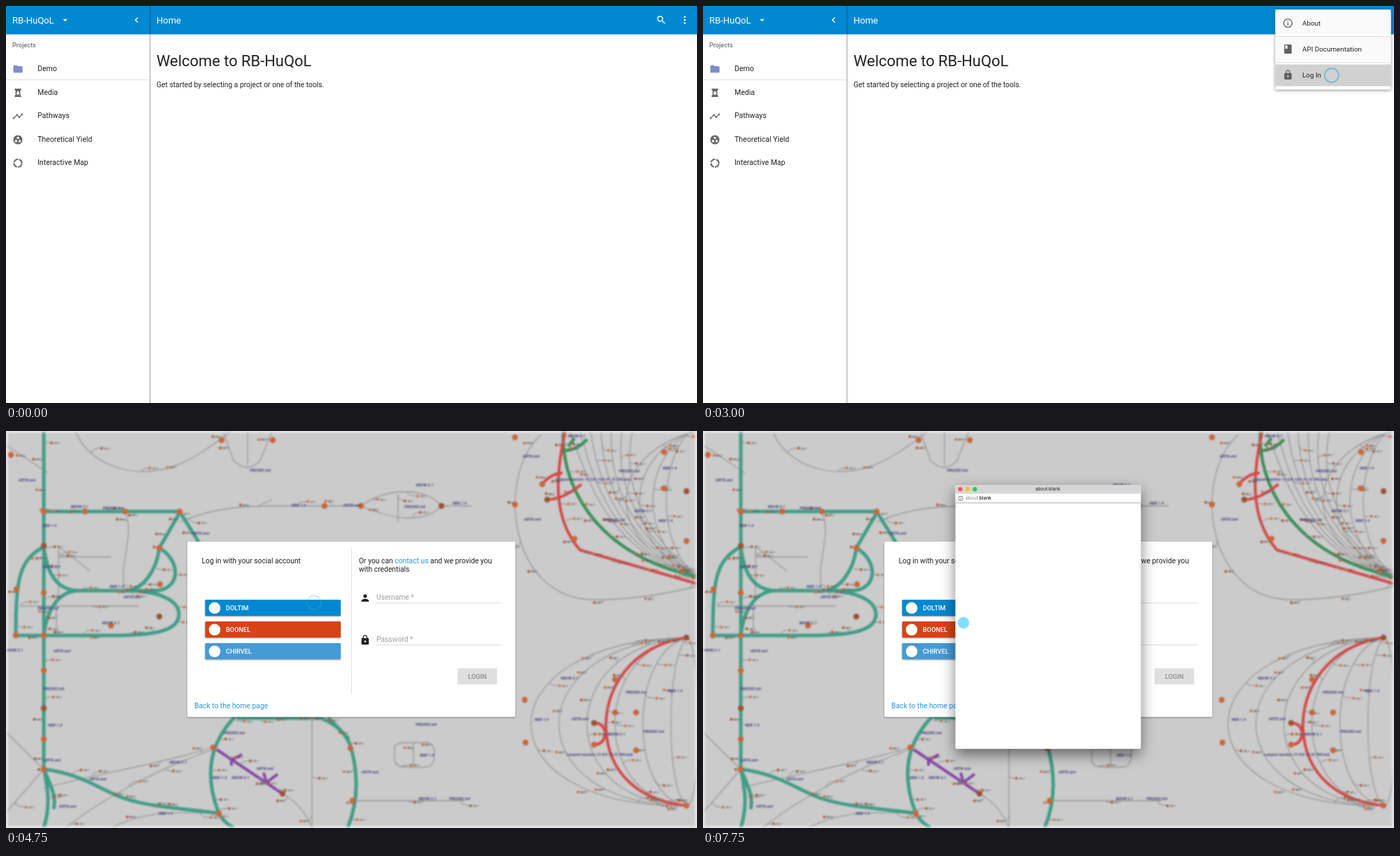
Write an HTML page that moves like this. It is 987 by 567 pixels and loops after 8000 ms.

```html
<!DOCTYPE html>
<html lang="en">
<head>
<meta charset="utf-8">
<title>Log in walkthrough</title>
<style>
  html, body { margin: 0; width: 100%; height: 100%; overflow: hidden; background: #fff; }
  svg { display: block; width: 987px; height: 567px; font-family: Roboto, sans-serif; }
  text { fill: #212121; white-space: pre; }
  .nav { font-size: 10.55px; }
  .body { font-size: 10.3px; }
  .item { font-size: 9.85px; }
  .button { font-size: 9.2px; font-weight: 500; }
  .link { fill: #2196f3; }
  .hint { fill: #9e9e9e; }
  .chrome { font-family: Inter, sans-serif; font-size: 6.4px; }
  .raised { filter: drop-shadow(0 1px 1.2px rgba(0,0,0,.4)); }
  #menu { filter: drop-shadow(0 1.5px 2px rgba(0,0,0,.45)); }
  #popup { filter: drop-shadow(0 8px 10px rgba(0,0,0,.5)); }
  #map { filter: blur(.9px); }
  #map path { fill: none; }
  #map text { font: italic bold 5.6px Roboto, sans-serif; fill: #42427f; text-anchor: middle; }
  #map .tag { font-size: 4px; fill: #555; }
</style>
</head>
<body>
<script>
const ICONS = {
  folder: 'M10 4H4c-1.1 0-1.99.9-1.99 2L2 18c0 1.1.9 2 2 2h16c1.1 0 2-.9 2-2V8c0-1.1-.9-2-2-2h-8l-2-2z',
  barrel: 'M5 3h14v3l-2 2v3l1 1-1 1v3l2 2v3H5v-3l2-2v-3l-1-1 1-1V8L5 6zM12 8c-2 2.6-3 4-3 5.300a3 3 0 0 0 6 0c0-1.300-1-2.700-3-5.300z',
  timeline: 'M23 8c0 1.1-.9 2-2 2-.18 0-.35-.02-.51-.07l-3.56 3.55c.05.16.07.34.07.52 0 1.1-.9 2-2 2s-2-.9-2-2c0-.18.02-.36.07-.52l-2.55-2.55c-.16.05-.34.07-.52.07s-.36-.02-.52-.07l-4.55 4.56c.05.16.07.33.07.51 0 1.1-.9 2-2 2s-2-.9-2-2 .9-2 2-2c.18 0 .35.02.51.07l4.56-4.55C8.02 9.36 8 9.18 8 9c0-1.1.9-2 2-2s2 .9 2 2c0 .18-.02.36-.07.52l2.55 2.55c.16-.05.34-.07.52-.07s.36.02.52.07l3.55-3.56C19.02 8.35 19 8.18 19 8c0-1.1.9-2 2-2s2 .9 2 2z',
  group: 'M12 2a10 10 0 1 0 0 20a10 10 0 1 0 0-20zM8 17.5a2.5 2.5 0 1 1 0-5a2.5 2.5 0 1 1 0 5zM12 10.500a2.5 2.5 0 1 1 0-5a2.5 2.5 0 1 1 0 5zM16 17.5a2.5 2.5 0 1 1 0-5a2.5 2.5 0 1 1 0 5z',
  search: 'M15.5 14h-.79l-.28-.27C15.41 12.59 16 11.11 16 9.5 16 5.91 13.09 3 9.5 3S3 5.91 3 9.5 5.91 16 9.5 16c1.61 0 3.09-.59 4.23-1.57l.27.28v.79l5 4.99L20.49 19l-4.99-5zm-6 0C7.01 14 5 11.99 5 9.5S7.01 5 9.5 5 14 7.01 14 9.5 11.99 14 9.5 14z',
  down: 'M7 10l5 5 5-5z',
  left: 'M15.41 7.41L14 6l-6 6 6 6 1.41-1.41L10.83 12z',
  info: 'M11 17h2v-6h-2v6zm1-15C6.48 2 2 6.48 2 12s4.48 10 10 10 10-4.48 10-10S17.52 2 12 2zm0 18c-4.41 0-8-3.59-8-8s3.59-8 8-8 8 3.59 8 8-3.59 8-8 8zM11 9h2V7h-2v2z',
  book: 'M18 2H6c-1.1 0-2 .9-2 2v16c0 1.1.9 2 2 2h12c1.1 0 2-.9 2-2V4c0-1.1-.9-2-2-2zM6 4h5v8l-2.5-1.5L6 12V4z',
  lock: 'M18 8h-1V6c0-2.76-2.24-5-5-5S7 3.24 7 6v2H6c-1.1 0-2 .9-2 2v10c0 1.1.9 2 2 2h12c1.1 0 2-.9 2-2V10c0-1.1-.9-2-2-2zm-6 9c-1.1 0-2-.9-2-2s.9-2 2-2 2 .9 2 2-.9 2-2 2zm3.1-9H8.9V6c0-1.71 1.39-3.1 3.1-3.1 1.71 0 3.1 1.39 3.1 3.1v2z',
  person: 'M12 12c2.21 0 4-1.79 4-4s-1.79-4-4-4-4 1.79-4 4 1.79 4 4 4zm0 2c-2.67 0-8 1.34-8 4v2h16v-2c0-2.66-5.33-4-8-4z'
};

const icon = (name, x, y, fill = '#6b6b6b', size = 15.8) =>
  `<path d="${ICONS[name]}" fill="${fill}" fill-rule="evenodd" transform="translate(${x} ${y}) scale(${size / 24}) translate(-12 -12)"/>`;
const text = (x, y, content, attrs = '') => `<text x="${x}" y="${y}" ${attrs}>${content}</text>`;
const rect = (x, y, w, h, fill, attrs = '') =>
  `<rect x="${x}" y="${y}" width="${w}" height="${h}" fill="${fill}" ${attrs}/>`;
const dot = (x, y, r, fill, attrs = '') => `<circle cx="${x}" cy="${y}" r="${r}" fill="${fill}" ${attrs}/>`;
const stroke = (color, width, d) => `<path d="${d}" stroke="${color}" stroke-width="${width}"/>`;

const nav = [['folder', 'Demo', 90], ['barrel', 'Media', 124], ['timeline', 'Pathways', 157.5],
  ['group', 'Theoretical Yield', 191], ['', 'Interactive Map', 224.5]];

const home = `
  <defs><linearGradient id="edge"><stop stop-color="#000" stop-opacity=".22"/><stop offset="1" stop-color="#000" stop-opacity="0"/></linearGradient></defs>
  ${rect(0, 0, 987, 567, '#fff')}
  ${rect(0, 0, 987, 40.5, '#0288d1')}
  ${rect(205, 0, 3, 567, 'url(#edge)')}
  ${rect(205, 0, .8, 567, '#000', 'opacity=".15"')}
  ${text(9, 25, 'RB-HuQoL', 'font-size="13" style="fill:#fff"')}
  ${icon('down', 84.5, 20, '#fff')}${icon('left', 186.5, 20, '#fff')}
  ${text(215, 25, 'Home', 'font-size="13" style="fill:#fff"')}
  ${icon('search', 936, 20, '#fff')}
  ${[15.6, 20.1, 24.6].map(y => dot(969.5, y, 1.4, '#fff')).join('')}
  ${text(9, 59.3, 'Projects', 'font-size="9.1" font-weight="500" style="fill:#757575"')}
  ${rect(0, 105, 205, 1, '#e0e0e0')}
  ${nav.map(([name, label, y]) => text(45, y + 2.5, label, 'class="nav"') +
    (name ? icon(name, 17, y, name === 'folder' ? '#7f8ecb' : undefined) : '')).join('')}
  <circle cx="17" cy="224.5" r="5.5" fill="none" stroke="#6b6b6b" stroke-width="2.2" stroke-dasharray="7.140 1.500" transform="rotate(12 17 224.5)"/>
  ${text(215, 85.5, 'Welcome to RB-HuQoL', 'font-size="21.9"')}
  ${text(215, 116, 'Get started by selecting a project or one of the tools.', 'class="body"')}`;

const menu = `<g id="menu">
  ${rect(817.5, 5, 165, 114.5, '#fff', 'rx="1.3"')}
  ${[9, 46, 83.5].map(y => rect(817.5, y, 165, 31, '#fff', 'class="row"')).join('')}
  ${[43, 80].map(y => rect(817.5, y, 165, 1, '#e0e0e0')).join('')}
  ${[['info', 'About'], ['book', 'API Documentation'], ['lock', 'Log In']].map(([name, label], i) =>
    icon(name, 835.5, 24.5 + 37 * i, '#616161') + text(856, 27.6 + 37 * i, label, 'class="item"')).join('')}
  </g>
  <g id="status">${rect(-2, 558.5, 330, 12, '#ececec', 'rx="2" stroke="#b5b5b5" stroke-width=".8"')}
  ${text(1, 565, 'https://app.rb-huqol.eu/app/docs', 'class="chrome" style="font-size:5.6px"')}</g>`;

const fan = (count, curve) => Array.from({ length: count }, (_, i) => curve(i / (count - 1))).join('');
const TEAL = '#409e87', RED = '#d54848', GREY = '#989898';

const map = `<g id="map">
  ${rect(-9, -9, 1005, 585, '#cbcbcb')}
  ${stroke(GREY, 1.3, `M170 115C185 150 160 190 170 228M75 240V165L120 200M75 180H150M20 250H190M72 292V240M0 20L60 60
    M100 0C110 40 190 90 280 30S300 0 315 0M310 0L325 42Q345 62 363 42L380 0M345 0V50
    M248 130C300 108 340 107 400 107H507C545 80 600 80 622 107C600 130 560 130 507 107M622 107H665M560 90V130M380 98L360 107
    M85 567C130 530 220 480 296 455M54 510C130 490 220 475 296 452M0 545L54 483M395 518Q425 535 437 567M437 409V567
    M495 528H655M555 450Q560 445 570 445H600Q612 445 612 462T600 480H570Q557 480 555 470ZM582 445V480M150 567C200 540 250 545 304 546M0 430Q40 470 54 483`)}
  ${stroke(GREY, 1.3, 'M765 5C700 60 715 240 840 241Q910 241 987 222' +
    fan(7, u => `M${805 + 90 * u} 0C${830 + 45 * u} ${60 + 30 * u} ${850 + 80 * u} 165 987 ${213 - 10 * u}`) +
    fan(4, u => `M${987 - 8 * u} 0C${865 + 75 * u} 30 ${840 + 80 * u} 150 987 210`))}
  ${stroke(GREY, 1.3, fan(7, u => `M974 295C${675 + 320 * u} ${300 + 20 * u} ${675 + 320 * u} ${540 - 20 * u} 974 535`))}
  ${stroke(TEAL, 5, `M54 0V483M54 115H248L276 160M248 117L219 167C215 200 195 228 170 228H105C70 228 58 200 54 165
    C20 185 14 205 14 292M54 292C58 255 75 228 105 228M219 167C250 185 250 225 215 228H170M14 292H100C180 292 247 295 247 262C247 240 215 228 170 228
    M54 483C110 490 135 513 170 525S260 540 304 546M54 483C66 510 72 525 68 540M54 483C62 520 62 540 54 567
    M330 405Q300 435 294 470T304 546Q310 558 325 567M330 410H450Q485 425 493 453C503 490 503 530 488 567M460 409L490 440`)}
  ${stroke('#8546a6', 4, 'M301 455L395 518M322 470L337 462M322 470V478M372 502L388 490M372 502L368 488')}
  ${stroke('#3d9159', 4.5, 'M796 0C792 70 835 175 987 208M796 28Q815 28 830 12M803 22L812 10')}
  ${stroke(RED, 4, 'M799 0C785 60 780 125 820 170T987 218M765 76Q780 60 795 60M773 98Q795 98 822 76M972 295C890 308 855 370 857 425C860 490 905 528 972 535M840 417Q854 417 856 432M840 448Q854 448 856 432')}
  </g>
  ${rect(0, 0, 987, 567, 'none', 'stroke="#fff" stroke-width="5" opacity=".6" style="filter:blur(1.5px)"')}`;

const buttons = [['DOLTIM', '#0288d1'], ['BOONEL', '#d84315'], ['CHIRVEL', '#449bd6']];
const card = `<g class="raised">${rect(259, 158, 468.5, 250.5, '#fff', 'rx="1.5"')}</g>
  ${rect(493, 168, 1, 208, '#e0e0e0')}
  ${text(279.5, 188.5, 'Log in with your social account', 'class="body"')}
  ${text(504, 188.5, 'Or you can <tspan class="link">contact us</tspan> and we provide you', 'class="body"')}
  ${text(504, 201, 'with credentials', 'class="body"')}
  ${buttons.map(([label, color], i) => {
    const y = 241 + 31 * i;
    return `<g class="raised">${rect(284.5, y, 193.5, 23, color, 'rx="1.2" class="social"')}</g>` +
      dot(298, y + 11.8, 8.3, '#fff', 'class="logo"') +
      text(314, y + 14.7, label, 'class="button" style="fill:#fff"');
  }).join('')}
  ${[['person', 'Username', 238], ['lock', 'Password', 298]].map(([name, label, y]) =>
    icon(name, 513, y + .5, '#212121') + text(529, y + 3.2, label + ' *', 'class="body hint"') +
    rect(528, y + 7.2, 178.5, .9, '#d8d8d8')).join('')}
  ${rect(645, 339, 56.500, 23, '#dfdfdf', 'rx="1.2"')}
  ${text(673.3, 353.5, 'LOGIN', 'class="button" text-anchor="middle" style="fill:#8b8b8b"')}
  ${text(269, 396, 'Back to the home page', 'class="body link"')}`;

const popup = `<g id="popup">
  ${rect(360.5, 77, 265, 377, '#fff', 'rx="2.5"')}
  <path d="M360.500 89.500V79.500q0-2.500 2.500-2.500h260q2.500 0 2.500 2.500v10z" fill="#d6d6d6"/>
  ${['#f25a55', '#f9bc3f', '#34c748'].map((c, i) => dot(367.5 + 10.4 * i, 83.1, 3.2, c)).join('')}
  ${text(492.5, 85.4, '', 'id="title" class="chrome" text-anchor="middle"')}
  ${icon('info', 368, 96.2, '#555', 8.4)}
  ${text(375, 98.4, '<tspan fill="#888" style="fill:#888">about:</tspan><tspan font-weight="500">blank</tspan>', 'class="chrome" style="font-size:6.6px"')}
  ${rect(360.5, 102.300, 265, .9, '#a5a5a5')}
  </g>`;

document.body.innerHTML = `<svg viewBox="0 0 987 567">
  <g id="home">${home}${menu}</g>
  <g id="login">${rect(0, 0, 987, 567, '#fff')}${rect(4, 0, 979, 567, '#0288d1')}
  <g id="backdrop">${map}</g>${card}${popup}</g>
  <circle id="cursor" r="10.5"/></svg>`;

const $ = id => document.getElementById(id);
const all = selector => [...document.querySelectorAll(selector)];

// Twigs, nodes and labels along the network.
let seed = 7;
const random = () => (seed = seed * 16807 % 2147483647) / 2147483647;
const nodes = [54,115, 113,115, 170,115, 248,115, 54,164, 219,167, 54,231, 15,226, 220,219, 219,265, 14,292, 54,292,
  150,278, 54,342, 54,396, 54,440, 54,483, 296,452, 304,546, 395,518, 492,453, 495,528, 455,107, 507,107, 622,107,
  308,13, 381,13, 727,9, 766,76, 773,98, 812,154, 727,105, 940,30, 940,82, 972,86, 972,157, 741,384, 742,445,
  870,355, 840,417, 840,448, 870,402, 900,402, 900,456, 972,295, 972,535, 7,34];
const labels = [30,72, 105,110, 153,112, 62,137, 278,148, 65,196, 60,255, 158,224, 180,239, 150,276, 363,58, 418,108,
  494,108, 598,79, 584,110, 648,105, 750,38, 815,9, 890,59, 948,55, 752,128, 910,116, 869,129, 942,130, 80,316,
  12,315, 68,370, 70,422, 66,472, 805,355, 900,375, 765,414, 820,413, 872,435, 925,431, 956,373, 131,499, 246,475,
  326,433, 305,497, 370,484, 335,497, 600,421, 601,465, 520,489, 602,527, 648,527, 228,548, 88,538];
const pairs = list => list.flatMap((x, i) => i % 2 ? [] : [[x, list[i + 1]]]);

let detail = '';
for (const path of all('#map path')) {
  const length = path.getTotalLength();
  const step = path.getAttribute('stroke') === GREY ? 75 : 38;
  for (let s = 15; s < length; s += step * (.6 + .8 * random())) {
    const p = path.getPointAtLength(s), side = random() < .5 ? -1 : 1;
    const x = p.x + side * (8 + 8 * random()), y = p.y + 16 * (random() - .5);
    detail += `<path d="M${p.x} ${p.y}Q${p.x} ${y} ${x} ${y}" stroke="#888"/>` +
      dot(x, y, 2, random() < .5 ? '#a85c3c' : '#cb7345') + text(x + 8, y + 1, 'gx_c', 'class="tag"');
  }
}
pairs(nodes).forEach(([x, y], i) => detail += dot(x, y, 4.2, i % 5 === 4 ? '#9a5338' : '#c8683c'));
pairs(labels).forEach(([x, y], i) => detail += text(x, y, ['ABTR.xml', 'MDHK 2.1', 'PRQSK2.ind', 'NDB 1.4'][i % 4]));
detail += text(838, 71, 'Lumped reaction 13.5/0.12/5.41 (0.798.ind)') + text(848, 464, 'Lumped reaction 13.5/0.12 (0.798.ind)');
$('map').insertAdjacentHTML('beforeend', detail);

// Pointer stops: tick, x, y, ring opacity.
const stops = [[1, 832, 11, .4], [2, 870, 12, .4], [3, 915, 15, .4], [4, 950, 18, .4], [5, 966, 20, .5],
  [6, 966, 24, .3], [7, 964, 30, .3], [8, 958, 43, .3], [9, 946, 57, .3], [10, 915, 85, .3], [11, 898, 99, .4],
  [12, 898, 99, .65], [13, 898, 99, .15], [14, 898, 99, .06], [16, 882, 94, .35], [17, 770, 125, .35],
  [18, 600, 185, .35], [19, 440, 245, .35], [20, 372, 268, .4], [21, 372, 283, .5], [24, 372, 283, .3], [30, 372, 274, .3]];
const TICK = 250, TICKS = 32;
const show = (element, on) => element.style.display = on ? '' : 'none';

function draw(now) {
  const k = Math.floor(now / TICK) % TICKS;
  const loggedOut = k < 13;
  show($('home'), loggedOut);
  show($('login'), !loggedOut);

  show($('menu'), k >= 6);
  $('menu').style.opacity = k === 6 ? .8 : 1;
  show($('status'), k === 9 || k === 10);
  const shades = k < 7 ? ['#fff', '#fff', '#fff']
    : k < 10 ? ['#eee', '#fff', '#fff']
    : k < 11 ? ['#fafafa', '#eee', '#fff']
    : k < 12 ? ['#fff', '#f5f5f5', '#eee'] : ['#fafafa', '#fafafa', '#d1d1d1'];
  all('.row').forEach((row, i) => row.setAttribute('fill', shades[i]));

  show($('backdrop'), k >= 14);
  all('.logo').forEach(logo => show(logo, k >= 14));
  const social = all('.social');
  social[0].setAttribute('fill', k === 20 ? '#039be5' : buttons[0][1]);
  social[1].setAttribute('fill', k >= 21 && k <= 23 ? '#f4511e' : buttons[1][1]);

  show($('popup'), k >= 23);
  const scale = k === 23 ? .589 : 1;
  $('popup').setAttribute('transform', `translate(493 265.500) scale(${scale}) translate(-493 -265.500)`);
  $('popup').style.opacity = k === 23 ? .6 : 1;
  $('title').textContent = k < 30 ? 'Untitled' : 'about:blank';

  const stop = stops.filter(s => s[0] <= k).pop();
  const cursor = $('cursor'), pressed = k === 31;
  show(cursor, stop);
  if (stop) {
    const [, x, y, opacity] = stop;
    const looks = { cx: x, cy: y, r: pressed ? 8.3 : 10, fill: pressed ? '#80dfff' : 'none',
      stroke: pressed ? 'none' : k >= 21 && k <= 23 ? '#4c6a70' : '#3fb6d8', 'stroke-width': k === 12 ? 2 : 1.3, opacity: pressed ? 1 : opacity };
    for (const name in looks) cursor.setAttribute(name, looks[name]);
  }
}

function loop() {
  draw(performance.now());
  requestAnimationFrame(loop);
}
loop();
</script>
</body>
</html>
```
